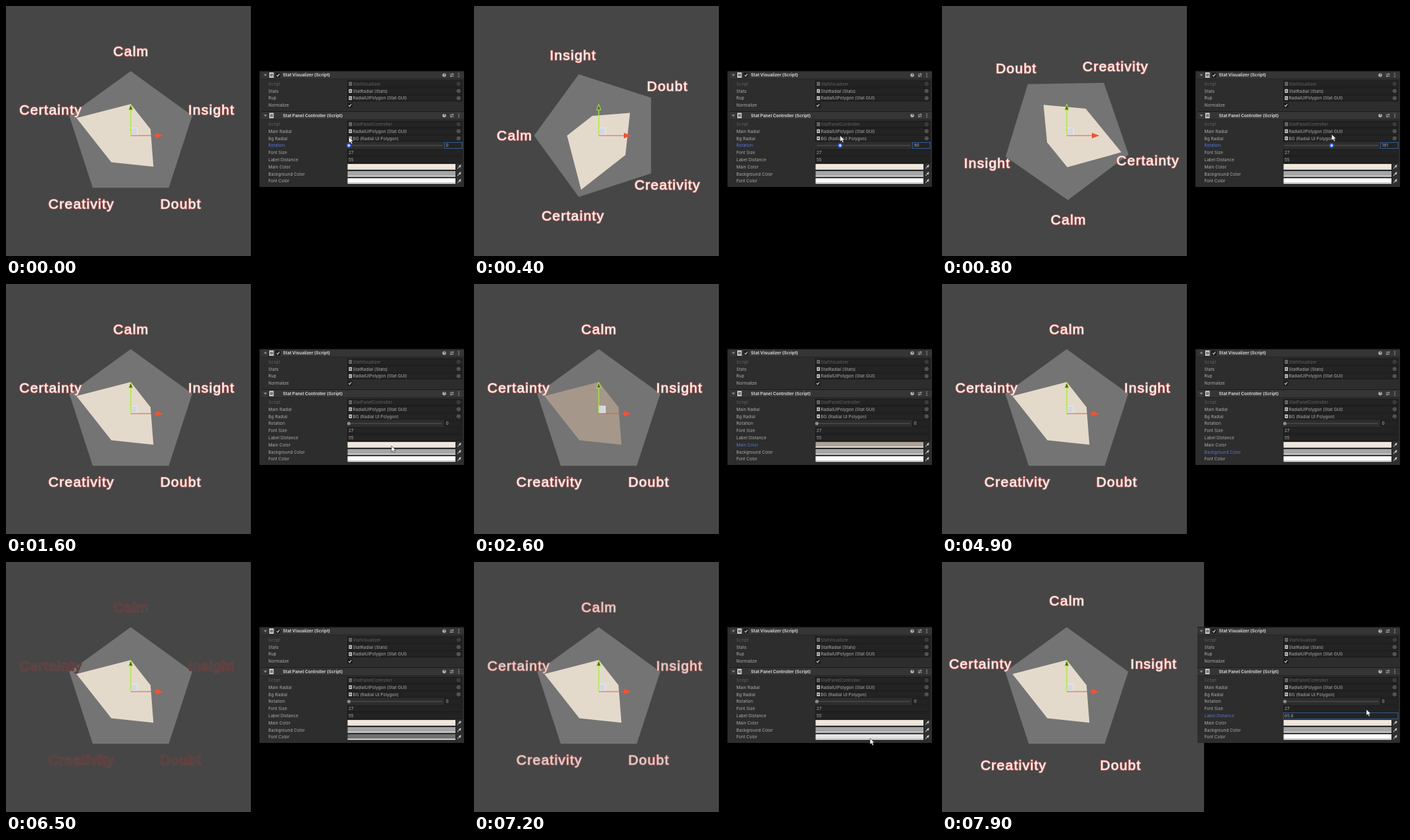
An HTML page that plays this animation: 700 by 380 pixels, repeating every 8000 ms.

```html
<!DOCTYPE html>
<html lang="en">
<head>
<meta charset="utf-8">
<title>Stat radial</title>
<style>
  html, body { margin: 0; width: 100%; height: 100%; overflow: hidden; background: #000; }
  svg { display: block; width: 700px; height: 380px; }
  .ui text { font: 6.5px Inter, Roboto, sans-serif; fill: #adadad; }
  .ui .head { font-weight: 700; fill: #d2d2d2; }
  .ui .dim { fill: #626262; }
  .ui .hot { fill: #5876d8; }
  .tag { font: 21px "Liberation Sans", Arial, sans-serif; letter-spacing: 1.25px; text-anchor: middle;
         paint-order: stroke; stroke-width: 2px; stroke-linejoin: round; }
</style>
</head>
<body>
<svg id="stage" viewBox="0 0 700 380"></svg>
<script>
const LOOP = 8000, STEP = 100;
const CX = 189, CY = 197, R = 98;
const stage = document.getElementById('stage');

function add(parent, name, attrs = {}, text) {
  const el = document.createElementNS('http://www.w3.org/2000/svg', name);
  set(el, attrs);
  if (text !== undefined) el.textContent = text;
  parent.appendChild(el);
  return el;
}
function set(el, attrs) {
  for (const k in attrs) el.setAttribute(k, attrs[k]);
}
const box = (p, x, y, width, height, fill, more) => add(p, 'rect', { x, y, width, height, fill, ...more });
const line = (p, d, stroke, w = 1) => add(p, 'path', { d, stroke, 'stroke-width': w, fill: 'none' });
const label = (p, x, y, s, cls = '') => add(p, 'text', { x, y: y + 2.4, class: cls }, s);

// Scene view
const view = box(stage, 0, 0, 371, 380, '#464646');
const back = add(stage, 'polygon');
const front = add(stage, 'polygon');

const names = ['Calm', 'Insight', 'Doubt', 'Creativity', 'Certainty'];
const stats = [48, 31.5, 58.5, 50, 86.5];
const tags = names.map(s => add(stage, 'text', { class: 'tag' }, s));

const gizmo = add(stage, 'g');
box(gizmo, 189.5, 185.5, 9.5, 10.5, '#d6d8de', { stroke: '#eef0f6', 'stroke-width': .8 });
line(gizmo, 'M189 196V158', '#a4ea35', 1.3);
add(gizmo, 'path', { d: 'M189 149.5L185.8 158H192.2Z', fill: '#55662a', stroke: '#b9f23c', 'stroke-width': 1 });
line(gizmo, 'M189 197H228', '#dd5a48', 1.2);
add(gizmo, 'path', { d: 'M238.5 197L227 192.8V201.2Z', fill: '#ee5438' });

// Inspector
const ui = add(stage, 'g', { class: 'ui' });
const base = box(ui, 384, 99, 310, 176, '#2d2d2d');

function header(y, title, toggle) {
  box(ui, 387, y - 5.5, 307, 11, '#353535');
  line(ui, `M387 ${y - 6}H694`, '#1b1b1b');
  line(ui, `M387 ${y + 6}H694`, '#262626');
  add(ui, 'path', { d: `M390.5 ${y - 1.5}h5l-2.5 3.6z`, fill: '#858585' });
  box(ui, 399, y - 4, 6.5, 8, '#d8d8d8');
  line(ui, `M401.3 ${y - 2.3}v4.6M403.3 ${y - 2.3}v4.6M400 ${y - 1}h4.6M400 ${y + 1}h4.6`, '#3c4a44', .8);
  if (toggle) check(412, y);
  label(ui, 419.5, y, title, 'head');
  add(ui, 'circle', { cx: 664, cy: y, r: 2.7, fill: '#b8b8b8' });
  add(ui, 'text', { x: 662.7, y: y + 1.8, style: 'font-size:5px;font-weight:700;fill:#333' }, '?');
  line(ui, `M672.5 ${y - 1.3}h6M672.5 ${y + 1.5}h6M676.8 ${y - 3}v3M674.3 ${y}v3`, '#b0b0b0', .9);
  for (const d of [-2.5, 0, 2.5]) box(ui, 685.4, y + d - .6, 1.2, 1.2, '#c4c4c4');
}
function check(x, y) {
  box(ui, x - 3.2, y - 3.2, 6.4, 6.4, '#1d1d1d', { stroke: '#141414', 'stroke-width': .6 });
  line(ui, `M${x - 2} ${y}l1.6 1.8l2.7 -3.6`, '#d4d4d4', 1.1);
}
const field = (x, y, w) => box(ui, x, y - 4.6, w, 9.2, '#232323', { stroke: '#171717', 'stroke-width': .8 });

function objectRow(y, name, value, dim) {
  const cls = dim ? 'dim' : '';
  label(ui, 397.5, y, name, cls);
  field(517.5, y, 173.5);
  box(ui, 519.5, y - 2.8, 4.6, 5.6, dim ? '#777' : '#cfcfcf');
  line(ui, `M520.5 ${y}h2.6M521.8 ${y - 1.5}v3`, '#3a3a3a', .8);
  label(ui, 525.5, y, value, cls);
  add(ui, 'circle', { cx: 685.7, cy: y, r: 2.4, fill: 'none', stroke: dim ? '#5c5c5c' : '#8e8e8e', 'stroke-width': .8 });
  add(ui, 'circle', { cx: 685.7, cy: y, r: .9, fill: dim ? '#5c5c5c' : '#8e8e8e' });
}
function numberRow(y, name, value) {
  const cap = label(ui, 397.5, y, name);
  const frame = field(517.5, y, 173.5);
  return { cap, frame, value: label(ui, 519, y, value) };
}
function colorRow(y, name) {
  const cap = label(ui, 397.5, y, name);
  box(ui, 517, y - 4.8, 164.5, 9.6, '#151515');
  const swatch = box(ui, 517.5, y - 4.3, 163.5, 6.8, '#fff');
  box(ui, 517.5, y + 2.5, 163.5, 1.8, '#f4f4f4');
  box(ui, 682.5, y - 4.6, 9, 9.2, '#303030');
  line(ui, `M684 ${y + 2.8}l3.4 -3.4`, '#a8a8a8', 1.1);
  line(ui, `M686.6 ${y - 1.4}l2 2M687.4 ${y - .6}l1.7 -1.9`, '#d0d0d0', 1.7);
  return { cap, swatch };
}

header(105, 'Stat Visualizer (Script)', true);
objectRow(118.3, 'Script', 'StatVisualizer', true);
objectRow(129.2, 'Stats', 'StatRadial (Stats)');
objectRow(140, 'Rup', 'RadialUIPolygon (Stat GUI)');
label(ui, 397.5, 150.8, 'Normalize');
check(521, 150.8);
header(166.5, 'Stat Panel Controller (Script)');
objectRow(179.7, 'Script', 'StatPanelController', true);
objectRow(190.3, 'Main Radial', 'RadialUIPolygon (Stat GUI)');
objectRow(201.2, 'Bg Radial', 'BG (Radial UI Polygon)');

const turnCap = label(ui, 397.5, 212, 'Rotation');
line(ui, 'M519 212H661', '#595959', 1);
const knob = add(ui, 'circle', { cy: 212, r: 2.6 });
const turnBox = field(664.5, 212, 26.5);
const turnText = label(ui, 666.5, 212, '0');

numberRow(222.8, 'Font Size', '27');
const dist = numberRow(233.7, 'Label Distance', '55');
const mainRow = colorRow(244.4, 'Main Color');
const backRow = colorRow(255.2, 'Background Color');
const fontRow = colorRow(266, 'Font Color');

const cursor = add(stage, 'path', {
  d: 'M0 0V9.2L2.2 7.3L3.8 10.8L5.4 10L3.9 6.7H6.8Z', fill: '#fff', stroke: '#222', 'stroke-width': .6
});

// Motion tables: [time, value, ...]
const turn = [[0, 0], [100, 14], [300, 62], [500, 118], [700, 166], [800, 181], [900, 172], [1000, 140], [1200, 52], [1300, 10], [1400, 0]];
const mainTone = [[1900, 1], [2200, .55], [2500, .3], [2800, .65], [3100, 1]];
const backTone = [[4000, 1], [4300, .55], [4500, .4], [4800, 1]];
const fontTone = [[6200, 1], [6300, .65], [6500, 0], [6800, .1], [7300, 1]];
const gap = [[7500, 55], [7600, 57], [7900, 65.6]];
const paths = [
  [[1400, 520, 206], [1500, 556, 230], [1600, 584, 246], [1900, 590, 243]],
  [[3200, 640, 268], [3500, 618, 256], [3800, 598, 248], [4000, 599, 251]],
  [[5100, 660, 270], [5500, 626, 266], [6000, 602, 262], [6200, 600, 263]],
  [[7200, 600, 268], [7400, 560, 246]],
  [[7500, 432, 230], [7700, 530, 227], [7900, 643, 224]]
];

function at(rows, t, col = 1) {
  if (t <= rows[0][0]) return rows[0][col];
  for (let i = 1; i < rows.length; i++) {
    const a = rows[i - 1], b = rows[i];
    if (t <= b[0]) return a[col] + (b[col] - a[col]) * (t - a[0]) / (b[0] - a[0]);
  }
  return rows[rows.length - 1][col];
}
const mix = (a, b, k) => `rgb(${a.map((v, i) => Math.round(v + (b[i] - v) * k))})`;
const polar = (i, r, deg) => {
  const a = (i * 72 - deg) * Math.PI / 180;
  return [CX + Math.sin(a) * r, CY - Math.cos(a) * r];
};
const ring = (radii, deg) => radii.map((r, i) => polar(i, r, deg).map(v => v.toFixed(2)).join()).join(' ');
const heat = (el, on) => el.setAttribute('class', on ? 'hot' : '');
const focus = (el, on) => el.setAttribute('stroke', on ? '#3566b0' : '#171717');

function placeCursor(t, x) {
  if (t < 1400) {
    const y = at([[0, 199], [800, 195], [1300, 206]], t);
    return [x, y];
  }
  const path = paths.find(p => t >= p[0][0] && t <= p[p.length - 1][0]);
  return path && [at(path, t), at(path, t, 2)];
}

function draw(t) {
  const deg = at(turn, t), d = at(gap, t);
  const m = at(mainTone, t), b = at(backTone, t), f = at(fontTone, t);
  const wide = t >= 7500, turning = t < 1400;

  view.setAttribute('width', wide ? 397 : 371);
  set(base, wide ? { x: 387, width: 307 } : { x: 384, width: 310 });
  set(back, { points: ring(Array(5).fill(R), deg), fill: mix([82, 82, 82], [116, 116, 116], b) });
  set(front, { points: ring(stats, deg), fill: mix([120, 104, 92], [228, 218, 203], m) });

  const fill = mix([76, 70, 70], [255, 250, 249], f), stroke = mix([116, 66, 64], [204, 122, 116], f);
  tags.forEach((el, i) => {
    const [x, y] = polar(i, 128 + (d - 55) * .945, deg);
    set(el, { x: x + .6, y: y + 7.2, fill, stroke });
  });

  const x = 519.5 + deg / 360 * 141;
  set(knob, { cx: x, fill: turning ? '#e8ecff' : '#8c8c8c', stroke: turning ? '#2f5be8' : 'none', 'stroke-width': 1.8 });
  turnText.textContent = Math.round(deg);
  heat(turnCap, turning);
  focus(turnBox, turning);

  dist.value.textContent = +d.toFixed(1);
  heat(dist.cap, wide);
  focus(dist.frame, wide);

  mainRow.swatch.setAttribute('fill', mix([126, 110, 98], [243, 232, 220], m));
  backRow.swatch.setAttribute('fill', mix([96, 96, 96], [166, 166, 166], b));
  fontRow.swatch.setAttribute('fill', mix([112, 112, 112], [255, 255, 255], f));
  heat(mainRow.cap, t >= 1900 && t < 3200);
  heat(backRow.cap, t >= 4000 && t < 5100);

  const p = placeCursor(t, x);
  cursor.style.display = p ? '' : 'none';
  if (p) cursor.setAttribute('transform', `translate(${p[0]} ${p[1]})`);
}

const start = performance.now();
function tick() {
  const t = (performance.now() - start) % LOOP;
  draw(Math.floor(t / STEP) * STEP);
  requestAnimationFrame(tick);
}
draw(0);
requestAnimationFrame(tick);
</script>
</body>
</html>
```
